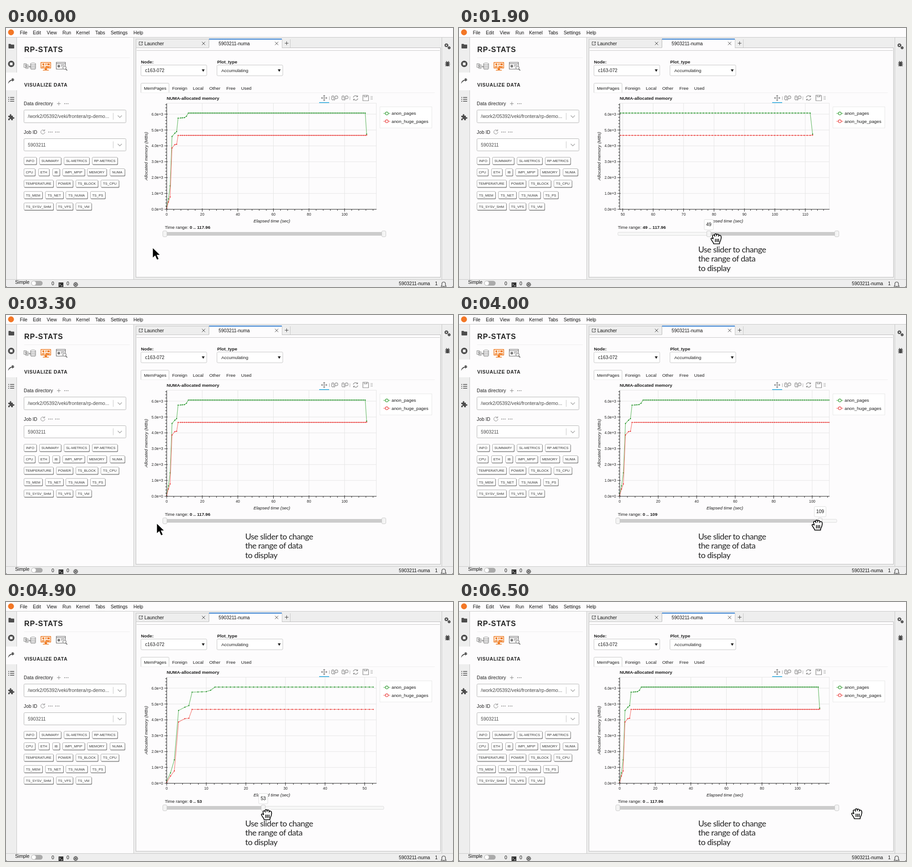
Recreate the animation shown at these times as an HTML page. Size 982x570 px, loop 6.6 s.

```html
<!DOCTYPE html>
<html lang="en">
<head>
<meta charset="utf-8">
<title>Memory range slider</title>
<style>
html, body { margin: 0; width: 100%; height: 100%; overflow: hidden; background: #fff; }
svg { display: block; font: 10.3px "Liberation Sans", Arial, sans-serif; fill: #111; }
.plot { font-size: 9.75px; fill: #1c1c1c; }
.tick { font-size: 8.2px; fill: #222; }
.tip { font-size: 10.3px; }
.chip { font-size: 7.6px; fill: #333; text-anchor: middle; }
.bold { font-weight: bold; }
.end { text-anchor: end; }
.mid { text-anchor: middle; }
.ital { font-style: italic; }
.head { font-weight: bold; fill: #222; }
.note { font: 18px Lato, Carlito, sans-serif; letter-spacing: -.5px; fill: #222; }
.line { fill: none; stroke: #888; }
.ink { fill: none; stroke: #444; }
.dark { fill: #4c4c4c; }
.box { fill: #fff; stroke: #c6c6c6; }
.edge { fill: none; stroke: #c8c8c8; }
</style>
</head>
<body>
<svg width="982" height="570" viewBox="0 0 982 570">
  <defs><clipPath id="area"><rect x="351" y="165" width="463.5" height="235.5"/></clipPath></defs>

  <!-- page regions -->
  <rect width="982" height="570" fill="#fdfcfd"/>
  <rect y="20" width="982" height="550" fill="#eee"/>
  <rect x="24" y="20" width="256" height="533" fill="#fdfcfd"/>
  <rect x="0" y="98" width="25" height="39" fill="#fdfcfd"/>
  <path class="edge" d="M0 20.5H982M23.5 20V98M23.5 137V553M280.5 20V553M957.5 20V553M0 553.5H982"/>
  <rect x="285.5" y="43.5" width="669" height="505" fill="#fdfcfd" stroke="#bbb"/>
  <rect x="285.5" y="24.5" width="160" height="19" fill="#eee" stroke="#c4c4c4"/>
  <rect x="446" y="24" width="160" height="20" fill="#fdfcfd"/>
  <rect x="446" y="23.5" width="160" height="2" fill="#2979d0"/>
  <path class="edge" d="M446 25V43M606.5 25V43M624.5 25V43M287 49.5H953"/>
  <circle cx="11" cy="9.5" r="6.5" fill="#f37726"/>
  <g id="menu"></g>

  <!-- dock tabs -->
  <path class="ink" d="M296 30.5h-3.500v7h7v-3M297 30.500h3v3M300 30.500l-4 4"/>
  <text x="304" y="37.500">Launcher</text>
  <text x="467" y="37.500">5903211-numa</text>
  <path class="ink" d="M430.500 30.500l7 7m0-7l-7 7M591 30.500l7 7m0-7l-7 7M612.500 33.500h8m-4-4v8"/>

  <!-- side bars -->
  <g class="dark">
    <path d="M5.500 36q0-1 1-1h3.500l1.500 1.500h5.500q1 0 1 1v6.500q0 1-1 1h-10.500q-1 0-1-1z"/>
    <path fill-rule="evenodd" d="M11.500 72a7 7 0 1 0 .01 0zM8.500 76h6v6h-6z"/>
    <path d="M4.500 123q.5-8 8.500-9.500l-1-2.500 6.500 3-4.500 4-.5-2.500q-5 .5-9 7.500zM13 110.500q3.500-.5 5 2l-3.500-.5z"/>
    <path d="M5 152h2v1.600H5zm4 0h9v1.600H9zM5 156.200h2v1.600H5zm4 0h9v1.600H9zM5 160.400h2v1.600H5zm4 0h9v1.600H9z"/>
    <path d="M5 193h3.500q-.8-3.500 1.500-3.500t1.500 3.500H15v3.500q3.500-.8 3.500 1.500t-3.500 1.500V203h-3.500q0-3-1.800-3t-1.800 3H5v-3.500q3 0 3-1.700t-3-1.700z"/>
    <ellipse cx="970" cy="79.500" rx="3.500" ry="4.800"/>
  </g>
  <path class="ink" stroke-width="1.400" d="M965 76h10M964.500 79.500h11M965 83h10M967 73l2 2M973 73l-2 2"/>
  <g class="ink" stroke-width="2">
    <circle cx="967.500" cy="38" r="2.600"/><circle cx="973.500" cy="43.500" r="1.700"/>
    <circle cx="967.500" cy="38" r="4" stroke-width="1" stroke-dasharray="1.600"/>
    <circle cx="973.500" cy="43.500" r="3" stroke-width="1" stroke-dasharray="1.300"/>
  </g>

  <!-- control panel -->
  <text class="head" x="40" y="52.500" style="font-size:16px;letter-spacing:1px">RP-STATS</text>
  <path d="M40 65.500H272" stroke="#eee"/>
  <g class="line" stroke-width="1.100">
    <path d="M39.500 78.500h5v8h-5zM43.500 81h5v8h-5zM41 81.500h2M45 84h2.500M45 86.500h2.500M49.500 85h4M51.500 83.500l2 1.500-2 1.500"/>
    <ellipse cx="59.500" cy="79" rx="5.500" ry="2"/>
    <path d="M54 79v10q0 2 5.500 2t5.500-2V79M54 82.500q0 2 5.500 2t5.500-2M54 86q0 2 5.500 2t5.500-2"/>
    <path stroke="#666" d="M125 90.500h-14.500v-15h20v8M110.500 78.500h20"/>
    <circle cx="116" cy="84" r="2.500" fill="#777"/><path stroke="#666" d="M121 81.500h7M121 84h3"/>
    <circle cx="128.500" cy="87.500" r="3.500" fill="#fff" stroke="#666"/>
    <path stroke="#555" stroke-width="1.600" d="M131 90l3.500 3.500"/>
  </g>
  <g fill="#ee7d26">
    <rect x="76" y="75" width="23" height="14" rx="1"/><path d="M85 89h5v3h4v1.500H81V92h4z"/>
    <path d="M77.500 76.500h20v11h-20z" fill="#fff3e8"/><circle cx="82" cy="80" r="2.200"/>
    <path d="M86 78.500h4v1.500h-4zM86 81h3v1h-3zM79 84h2v3h-2zM82 83h2v4h-2zM91 78h5v4h-5zM86 85l4-1.500 3 1 3-1v3.500h-10z"/>
  </g>
  <text class="head" x="40" y="129.200" style="font-size:10.600px;letter-spacing:.65px">VISUALIZE DATA</text>
  <text x="39" y="170" fill="#222">Data directory</text>
  <text x="39" y="232.500" fill="#222">Job ID</text>
  <path class="line" d="M112 166.500h8m-4-4v8M84 225.500a4.500 4.500 0 1 0 1.500 3.500M85 223v3.500h-3.500"/>
  <path stroke="#666" stroke-width="1.600" stroke-dasharray="1.700 2" d="M128 166.500h9.500M93 229h9.500M108 229h9.500"/>
  <g class="box">
    <rect x="39.500" y="180.500" width="224" height="28" rx="2" stroke="#b4b4b4"/>
    <rect x="39.500" y="243.500" width="224" height="27" rx="2" stroke="#b4b4b4"/>
    <path d="M235.500 187V202M235.500 249.500V264.500"/>
    <path fill="none" stroke="#aaa" stroke-width="1.500" d="M245.500 192.500l4.500 4.500 4.500-4.500M245.500 255l4.500 4.500 4.500-4.500"/>
  </g>
  <text x="48" y="198.300" fill="#4a4a4a" style="font-size:10.750px">/work2/05392/veki/frontera/rp-demo...</text>
  <text x="48" y="261" fill="#4a4a4a">5903211</text>
  <g id="chips"></g>

  <!-- chart controls -->
  <g class="plot">
    <text class="bold" x="296.500" y="78">Node:</text>
    <text class="bold" x="464" y="78">Plot_type</text>
    <g class="box">
      <rect x="296.500" y="81.500" width="144.500" height="23.500" rx="2"/>
      <rect x="463.500" y="81.500" width="144.500" height="23.500" rx="2"/>
      <path d="M296.500 142V123.500q0-2 2-2H356q2 0 2 2V142"/>
    </g>
    <path d="M296 142.500H942" stroke="#eee"/>
    <path fill="#222" d="M430 91h6.500l-3.250 5.500zM597 91h6.500l-3.250 5.500z"/>
    <text x="305.500" y="97" style="font-size:10.200px">c163-072</text>
    <text x="473" y="97" style="font-size:9.900px">Accumulating</text>
    <g id="tabs"></g>
    <text class="bold" x="353" y="157.500">NUMA-allocated memory</text>
    <rect x="821.500" y="173.500" width="114" height="46.500" fill="#fff" stroke="#e8e8e8"/>
    <text x="847" y="191.300">anon_pages</text>
    <text x="847" y="208.800">anon_huge_pages</text>
    <g fill="#fff" stroke-width="1.200"><path d="M829 188h15" stroke="#6cbc6c"/><circle cx="836.500" cy="188" r="3.200" stroke="#2a982a"/>
    <path d="M829 205.300h15" stroke="#f47c76"/><circle cx="836.500" cy="205.300" r="3.200" stroke="#e93434"/></g>
  </g>
  <g class="line" stroke-width="1.200">
    <path d="M693 154h12M699 148v12M695 152l-2 2 2 2M703 152l2 2-2 2M697 150l2-2 2 2M697 158l2 2 2-2"/>
    <path id="wheel" d="M715.500 152q0-3 2.500-3t2.500 3v3.500q0 3-2.500 3t-2.500-3zM718 151v2M723.500 155.500l-2.500 4M729 152.500a3.200 3.200 0 1 1-6.400 0a3.200 3.200 0 1 1 6.400 0"/>
    <use href="#wheel" x="22.500"/>
    <path d="M763 153a5 5 0 0 1 9-2M773 155a5 5 0 0 1-9 2M772.500 148.500v3h-3M763.500 159.500v-3h3"/>
    <path d="M784 148h11l1.500 1.500V160H784zM787 148v3.500h6V148M791 149v1.500"/>
    <path stroke="#bbb" d="M710.500 150.500v8M755.500 150.500v8"/>
    <path stroke-dasharray="1.500" d="M802 150v8M804.500 150v8"/>
  </g>
  <path d="M688 164.200h22" stroke="#26aae1" stroke-width="1.600"/>

  <g id="chart"></g>
  <text class="plot ital mid" x="584" y="428">Elapsed time (sec)</text>
  <text class="plot ital mid" transform="translate(311 282) rotate(-90)">Allocated memory (MBs)</text>
  <g id="slider"></g>
  <g id="note" class="note">
    <text x="525.500" y="493.500">Use slider to change</text>
    <text x="525.500" y="514">the range of data</text>
    <text x="525.500" y="534.500">to display</text>
  </g>

  <!-- status bar -->
  <text x="20" y="562.500">Simple</text>
  <rect x="55.500" y="556.500" width="25" height="10.500" rx="5.200" fill="#aaa"/>
  <circle cx="61" cy="561.700" r="5" fill="#fff" stroke="#bbb"/>
  <text x="100" y="566">0</text><text x="133" y="566">0</text>
  <rect x="115.500" y="560" width="10.500" height="10" fill="#333"/>
  <path d="M117.500 562.500l2 2-2 2M121 567.500h3" fill="none" stroke="#fff"/>
  <circle cx="153" cy="564.500" r="3.500" class="ink" stroke-width="1.500"/>
  <circle cx="153" cy="564.500" r="5" class="ink" stroke-dasharray="1.500"/>
  <path fill="#444" d="M151.500 563h3v3h-3z"/>
  <text x="863" y="566">5903211-numa</text><text x="942.500" y="566">1</text>
  <path class="ink" stroke-width="1.200" d="M956 568.500h11l-1.500-2v-3q0-4.500-4-4.500t-4 4.500v3zM960.500 570h2"/>
  <path fill="#333" d="M0 567q0 3 3 3H0zM982 567q0 3-3 3h3z"/>

  <!-- pointers -->
  <path id="arrow" fill="#000" stroke="#fff" stroke-width="1.300" d="M0 0V23.500L5.500 18.500 9.500 27.500 14 25.500 10 17H17.500z"/>
  <g id="hand" stroke="#000" stroke-width="1.700" stroke-linejoin="round" stroke-linecap="round">
    <path fill="#fff" d="M-5.500 12Q-6 9.500-8 7T-11.500 1Q-11-1.500-8 0L-6.500 1-8-4.500Q-8-7.500-5.500-7.500-4-7.500-3.300-6-4-9.500-1.500-9.800 .5-10 1-8 1.500-9.800 4-9 6-8.300 5.700-6 7.500-7.500 9.300-6.500 11.500-5 10.800 0 10.300 4 8.200 7.500 7.300 9 7.300 12z"/>
    <path fill="none" d="M-1.700 1.500V7.500M1.800 1.500V7.500M5.300 1.500V7.500M-3.300-6L-2.800-4.500M1-8V-5.500M5.700-6L5.300-4.500"/>
  </g>
</svg>
<script>
const $ = id => document.getElementById(id);
const text = (x, y, s, cls = '') => `<text class="${cls}" x="${x}" y="${y}">${s}</text>`;
const lerp = (a, b, k) => a + (b - a) * k;

const row = (names, xs, y) => names.split(' ').map((s, i) => text(xs[i], y, s)).join('');
$('menu').innerHTML = row('File Edit View Run Kernel Tabs Settings Help',
  [30.5, 59, 89.5, 124, 154, 196, 230, 280], 13.5);
$('tabs').innerHTML = row('MemPages Foreign Local Other Free Used',
  [303, 365, 410.5, 446.5, 484, 516.5], 135.5);

// label, left edge, width
const chipRows = [
  'INFO 39 28 SUMMARY 73 48 SL-METRICS 127 56 RP-METRICS 189 56',
  'CPU 39 25 ETH 71 24 IB 102 16 IMPI_MPIP 124 49 MEMORY 178 43 NUMA 228 33',
  'TEMPERATURE 39 65 POWER 110 37 TS_BLOCK 153 49 TS_CPU 208 40',
  'TS_MEM 39 41 TS_NET 86 40 TS_NUMA 131 48 TS_PS 185 33',
  'TS_SYSV_SHM 39 65 TS_VFS 110 37 TS_VM 153 35'
];
$('chips').innerHTML = chipRows.map((r, i) => {
  const y = 284.5 + i * 25.1;
  return r.replace(/(\S+) (\d+) (\d+) ?/g, (_, s, x, w) =>
    `<rect x="${+x + 1}" y="${y + 1}" width="${w}" height="16" rx="2" fill="#888"/>
     <rect x="${+x + .5}" y="${y}" width="${w - .5}" height="15.500" rx="2" fill="#fff" stroke="#999" stroke-width=".8"/>`
    + text(+x + w / 2, y + 10.7, s, 'chip'));
}).join('');

// samples: [seconds, MB]
const MAX = 117.96, LEFT = 353, WIDTH = 461, BASE = 399;
const times = [0, .97, 1.93, 3, 4.6, 5.6, 6.42, 7.9, 8.9, 10, 11.1, 12.2];
const green = [150, 660, 1480, 4590, 4800, 4900, 5750, 5760, 5770, 5780, 5870, 6070];
const red = [50, 460, 780, 3870, 4080, 4100, 4660];
for (let i = 1; i <= 102; i++) times.push(12.2 + i * .9745);
times.push(112.4);
const last = times.length - 1;
const greenData = times.map((t, i) => [t, i === last ? 4740 : green[i] ?? 6070]);
const redData = times.map((t, i) => [t, i === last ? 4680 : red[i] ?? 4660]);
const yOf = v => BASE - v * .0349;

function tickStep(span) {
  const err = s => Math.abs(6 - span / s);
  return [1, 2, 5, 10, 20, 50].reduce((a, b) => err(b) < err(a) ? b : a);
}

function series(data, xOf, lo, hi, line, dot) {
  const pts = data.filter(p => p[0] >= lo && p[0] <= hi).map(([t, v]) => [xOf(t), yOf(v)]);
  const dots = pts.map(([x, y]) => `<circle cx="${x}" cy="${y}" r="1.200"/>`).join('');
  return `<g clip-path="url(#area)"><polyline points="${pts.join(' ')}" fill="none" stroke="${line}" stroke-width="1.200"/><g fill="${dot}">${dots}</g></g>`;
}

function drawChart(lo, hi) {
  const xOf = t => LEFT + (t - lo) / (hi - lo) * WIDTH;
  const step = tickStep(hi - lo), minor = step / 5;
  let grid = `M${LEFT} 165.500H813.500V${BASE}`, ticks = `M${LEFT} 166V${BASE}H814`, labels = '';
  for (let n = Math.ceil(lo / minor); n * minor <= hi; n++) {
    const x = xOf(n * minor), major = n % 5 === 0;
    ticks += `M${x} ${major ? 397 : BASE}V${major ? 404 : 402}`;
    if (!major) continue;
    grid += `M${x} 166V${BASE}`;
    labels += text(x, 413, n * minor, 'tick mid');
  }
  for (let n = 0; n <= 33; n++) {
    const y = yOf(n * 200), major = n % 5 === 0;
    ticks += `M${major ? 348 : 350} ${y}H${major ? 355 : LEFT}`;
    if (!major) continue;
    grid += `M${LEFT} ${y}H814`;
    labels += text(345, y + 3, (n / 5).toFixed(1) + (n ? 'e+3' : 'e+0'), 'tick end');
  }
  $('chart').innerHTML = `<path d="${grid}" fill="none" stroke="#e5e5e5"/>`
    + series(greenData, xOf, lo, hi, '#6cbc6c', '#1f8f26')
    + series(redData, xOf, lo, hi, '#f47c76', '#e52b2b')
    + `<path d="${ticks}" fill="none" stroke="#222"/>` + labels;
}

function drawSlider(lo, hi, held) {
  const xOf = v => 349 + v / MAX * 481;
  const a = xOf(lo), b = xOf(hi);
  const knob = x => `<rect x="${x - 4.5}" y="446.500" width="9" height="13" rx="2.500" fill="#f4f4f4" stroke="#ccc"/>`;
  let out = `<text class="plot" x="349" y="442">Time range: <tspan class="bold">${lo} .. ${hi}</tspan></text>
    <rect x="349" y="449.500" width="481" height="7" rx="2" fill="#f7f7f7" stroke="#ddd"/>
    <rect x="${a}" y="449" width="${b - a}" height="8" fill="#ccc"/>` + knob(a) + knob(b);
  if (held) {
    const v = held === 'lo' ? lo : hi, x = xOf(v), w = 8.5 + String(v).length * 5.7;
    out += `<rect x="${x - w / 2}" y="421.500" width="${w}" height="22.500" rx="2" fill="#fff" stroke="#ddd"/>`
      + text(x, 436, v, 'tip mid');
  }
  $('slider').innerHTML = out;
}

// keyframes: [ms, values...]
const low = [[600, 0], [700, 1], [1200, 16], [1700, 52], [2100, 45], [2500, 21], [2900, 0]];
const high = [[3900, MAX], [4200, 92], [4400, 74], [4800, 50], [5000, 56], [5400, 100], [5600, MAX]];
const pointer = [
  [0, 322, 483], [300, 336, 468], [500, 346, 457], [600, 351, 460], [1200, 502, 463],
  [1700, 590, 463], [2100, 540, 463], [2500, 427, 463], [2900, 345, 464], [3000, 331, 458],
  [3300, 331, 458], [3500, 831, 457], [3700, 872, 455], [3900, 828, 461], [4400, 623, 463],
  [4800, 545, 466], [5000, 600, 468], [5400, 813, 471], [5600, 860, 474], [6000, 874, 468], [6300, 874, 465]
];

function at(keys, t) {
  const i = keys.findIndex(k => k[0] > t);
  if (i === 0) return keys[0].slice(1);
  if (i < 0) return keys[keys.length - 1].slice(1);
  const p = keys[i - 1], q = keys[i], k = (t - p[0]) / (q[0] - p[0]);
  return p.slice(1).map((v, j) => lerp(v, q[j + 1], k));
}
const within = (t, a, b) => t >= a && t < b;

function draw(t) {
  const lo = Math.round(at(low, t)[0]);
  const top = at(high, t)[0], hi = top === MAX ? MAX : Math.round(top);
  const held = within(t, 600, 2900) ? 'lo' : within(t, 3900, 5600) ? 'hi' : '';
  drawChart(lo, hi);
  drawSlider(lo, hi, held);
  const isArrow = t < 600 || within(t, 3000, 3800);
  const [x, y] = at(pointer, t);
  for (const [id, on] of [['arrow', isArrow], ['hand', !isArrow]]) {
    $(id).setAttribute('transform', `translate(${x} ${y})`);
    $(id).style.display = on ? '' : 'none';
  }
  $('note').style.display = t >= 300 ? '' : 'none';
}

const start = performance.now();
let shown = -1;
function tick() {
  const t = Math.floor((performance.now() - start) % 6600 / 100) * 100;
  if (t !== shown) draw(shown = t);
  requestAnimationFrame(tick);
}
tick();
</script>
</body>
</html>
```
